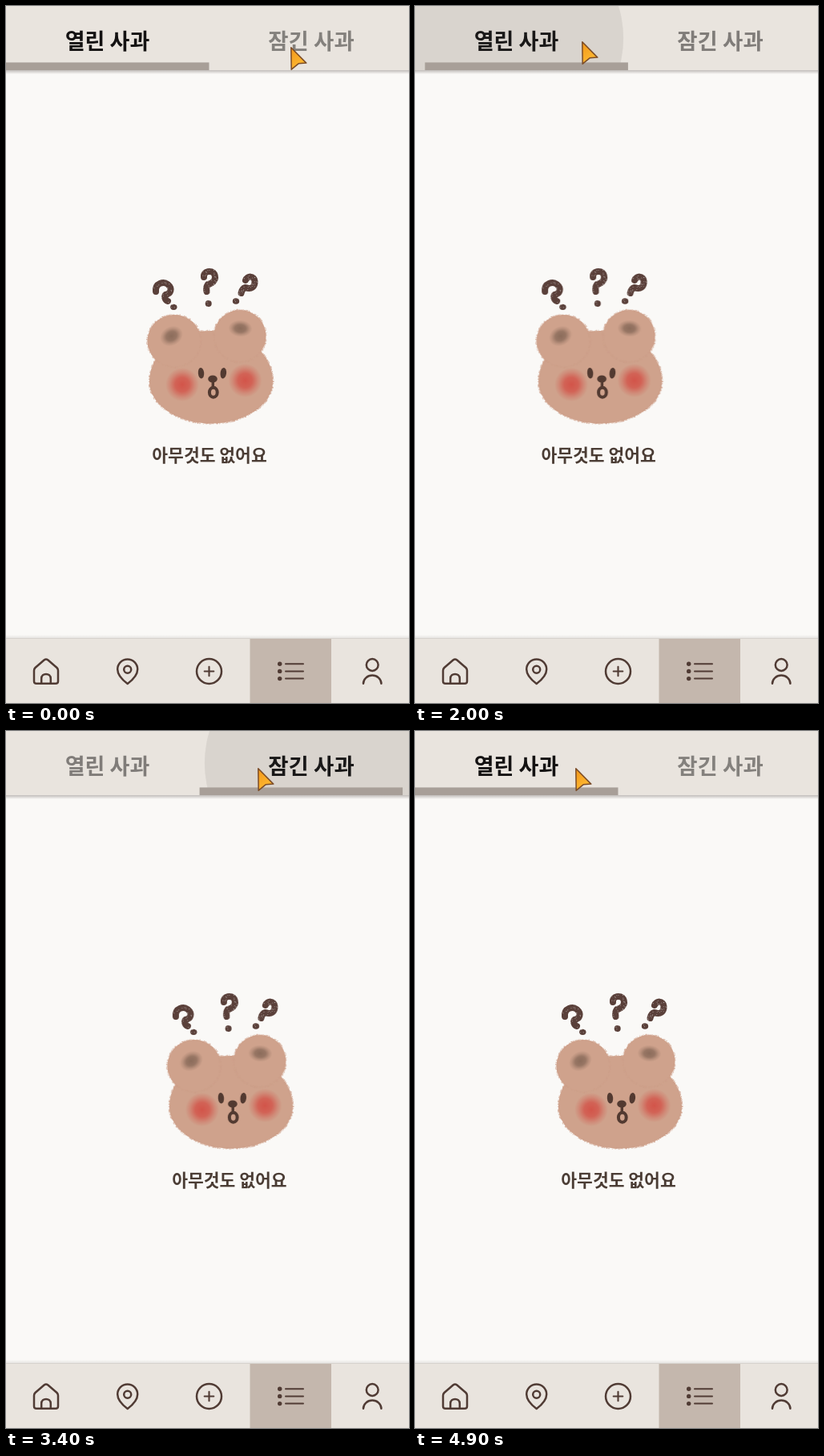
An HTML page with a canvas that plays this animation: 503 by 869 pixels, repeating every 5 s.

```html
<!DOCTYPE html>
<html lang="ko">
<head>
<meta charset="utf-8">
<title>사과 목록</title>
<style>
html, body { margin: 0; width: 100%; height: 100%; overflow: hidden; background: #faf9f7; }
canvas { display: block; width: 503px; height: 869px; }
</style>
</head>
<body>
<canvas id="stage"></canvas>
<script>
const W = 503, H = 869, LOOP = 5000, STEP = 100;
const PAGE = 508, TAB = PAGE / 2, BAR = 80, NAV = 788;
const FONT = '"Noto Sans CJK KR", "Noto Sans CJK", sans-serif';
const SLIDE = 338, FADE = 330;
const BROWN = '#503b34', FUR = '#cfa28c', INK = '#5a403a';

// Each tap: target tab, press, start of the page slide, release.
const taps = [
  { to: 1, press: 80, slide: 551, release: 700 },
  { to: 0, press: 1710, slide: 1755, release: 1835 },
  { to: 1, press: 3110, slide: 3155, release: 3235 },
  { to: 0, press: 4455, slide: 4505, release: 4540 }
];

// Pointer keys: time, x, y.
const pointer = [
  [0, 355, 51], [1000, 355, 51], [1100, 265, 46], [1200, 211, 44], [1300, 208, 44],
  [2500, 208, 44], [2600, 247, 44], [2700, 298, 45], [2800, 314, 46],
  [3700, 314, 46], [3800, 296, 46], [3900, 250, 46], [4000, 212, 46], [4100, 200, 46],
  [LOOP, 200, 46]
];

const clamp = v => Math.max(0, Math.min(1, v));
const mix = (a, b, k) => a + (b - a) * k;

// cubic-bezier(.25, .1, .25, 1)
function ease(x) {
  let lo = 0, hi = 1;
  for (let i = 0; i < 24; i++) {
    const s = (lo + hi) / 2;
    if (.75 * s * (1 - s) + s * s * s < x) lo = s; else hi = s;
  }
  const s = (lo + hi) / 2, r = 1 - s;
  return .3 * s * r * r + 3 * s * s * r + s * s * s;
}

function random(seed) {
  return () => (seed = (seed * 16807) % 2147483647) / 2147483647;
}

function makeCanvas(canvas) {
  const dpr = window.devicePixelRatio || 1;
  canvas.width = Math.round(W * dpr);
  canvas.height = Math.round(H * dpr);
  const c = canvas.getContext('2d');
  c.scale(dpr, dpr);
  c.lineCap = c.lineJoin = 'round';
  return c;
}

function oval(c, x, y, rx, ry, turn = 0) {
  c.beginPath();
  c.ellipse(x, y, rx, ry, turn, 0, Math.PI * 2);
}

function disc(c, color, ...shape) {
  c.fillStyle = color;
  oval(c, ...shape);
  c.fill();
}

function line(c, d, color, width) {
  c.strokeStyle = color;
  c.lineWidth = width;
  c.stroke(new Path2D(d));
}

function label(c, text, x, y, size, color) {
  c.font = `700 ${size}px ${FONT}`;
  c.textAlign = 'center';
  c.fillStyle = color;
  c.fillText(text, x, y);
}

// Soft spot, solid up to the given share of its radius.
function spot(c, x, y, rx, ry, turn, rgb, alpha, core) {
  c.save();
  c.translate(x, y);
  c.rotate(turn);
  c.scale(rx, ry);
  const g = c.createRadialGradient(0, 0, 0, 0, 0, 1);
  g.addColorStop(0, `rgba(${rgb},${alpha})`);
  g.addColorStop(core, `rgba(${rgb},${alpha * .82})`);
  g.addColorStop(.75, `rgba(${rgb},${alpha * .3})`);
  g.addColorStop(1, `rgba(${rgb},0)`);
  disc(c, g, 0, 0, 1, 1);
  c.restore();
}

function drawQuestions(c, rnd) {
  line(c, 'M187 356 C186 345 197 343 202 347 C208 352 206 359 199 360 C197 363 199 367 202 368', INK, 8);
  line(c, 'M247 338 C246 330 257 329 260 334 C263 340 259 346 252 347 C250 350 250 354 250.5 356', INK, 8);
  line(c, 'M299 342 C301 336 310 336 310.5 343 C311 350 306 354 299 351 C295 352 294 355 293.5 358', INK, 8);
  disc(c, INK, 209.3, 375.3, 4.2, 3.6);
  disc(c, INK, 252.7, 371, 4, 4);
  disc(c, INK, 287, 368, 4.2, 3.8);
  c.globalCompositeOperation = 'destination-out';
  for (let i = 0; i < 480; i++) {
    disc(c, 'rgba(0,0,0,.45)', 180 + rnd() * 138, 326 + rnd() * 53, .55, .55);
  }
  c.globalCompositeOperation = 'source-over';
}

function drawBear(c, rnd) {
  // Each part: centre, half width, height above and below the centre.
  const parts = [[256, 468, 77, 63, 52.5], [210, 417.5, 33.5, 32.5, 32.5], [292, 411.5, 32.5, 32.5, 32.5]];
  for (const [x, y, rx, up, down] of parts) {
    c.fillStyle = FUR;
    c.beginPath();
    c.ellipse(x, y, rx, up, 0, Math.PI, Math.PI * 2);
    c.ellipse(x, y, rx, down, 0, 0, Math.PI);
    c.fill();
    for (let i = 0; i < rx * 9; i++) {
      const a = rnd() * Math.PI * 2, out = rnd() * 2 - 1, s = Math.sin(a);
      disc(c, 'rgba(207,162,140,.5)', x + (rx + out) * Math.cos(a), y + ((s < 0 ? up : down) + out) * s, .75, .75);
    }
  }
  spot(c, 206.5, 411.5, 15, 12, -.5, '128,99,83', .85, .45);
  spot(c, 292.5, 402, 15, 10.5, .05, '128,99,83', .85, .45);
  spot(c, 220, 472, 21, 21, 0, '211,78,68', .92, .42);
  spot(c, 298.5, 467, 21, 21, 0, '211,78,68', .92, .42);
  const dark = '#523a31';
  disc(c, dark, 243.5, 457.7, 3.7, 6.8, -.08);
  disc(c, dark, 271.3, 457.7, 3.7, 6.8, .12);
  disc(c, dark, 258, 465, 5.8, 4.6);
  line(c, 'M258.3 466 V474', dark, 3.4);
  c.lineWidth = 4;
  oval(c, 258.8, 481.7, 4.9, 6);
  c.stroke();
}

const ctx = makeCanvas(document.getElementById('stage'));
const art = document.createElement('canvas');
const artCtx = makeCanvas(art);
drawQuestions(artCtx, random(71));
drawBear(artCtx, random(29));

function pagePosition(t) {
  let p = 0;
  for (const tap of taps) p = mix(p, tap.to, ease(clamp((t - tap.slide) / SLIDE)));
  return p;
}

function pointerAt(t) {
  const i = pointer.findIndex(key => key[0] > t);
  const [t0, x0, y0] = pointer[i - 1], [t1, x1, y1] = pointer[i];
  const k = (t - t0) / (t1 - t0);
  return [mix(x0, x1, k), mix(y0, y1, k)];
}

// A full circle fades in while a second one spreads from the pointer.
function drawRipple(tap, t) {
  const age = t - tap.press;
  const fade = 1 - clamp((t - tap.release) / FADE);
  if (age <= 0 || fade <= 0) return;
  const cx = TAB * (tap.to + .5), cy = BAR / 2;
  const radius = Math.hypot(TAB / 2, cy);
  const ripple = (alpha, x, y, r) => disc(ctx, `rgba(20,8,14,${alpha * fade})`, x, y, r, r);
  ripple(.074 * clamp(age / 120), cx, cy, radius);
  const spread = clamp((age - 50) / 225);
  if (spread > 0) {
    const k = 1 - (1 - spread) ** 2, [px, py] = pointerAt(tap.press);
    ripple(.074 * clamp((age - 50) / 75), mix(px, cx, k), mix(py, cy, k), radius * mix(.3, 1, k));
  }
}

function drawPage(x) {
  if (x <= -PAGE || x >= PAGE) return;
  ctx.drawImage(art, x, 0, W, H);
  label(ctx, '아무것도 없어요', x + 254, 568, 21.5, '#4a3c34');
}

function shade(y0, y1, alpha) {
  const g = ctx.createLinearGradient(0, y0, 0, y1);
  g.addColorStop(0, `rgba(60,50,45,${alpha})`);
  g.addColorStop(1, 'rgba(60,50,45,0)');
  ctx.fillStyle = g;
  ctx.fillRect(0, Math.min(y0, y1), W, Math.abs(y1 - y0));
}

function drawTabs(t, p) {
  shade(BAR, BAR + 5, .3);
  ctx.save();
  ctx.beginPath();
  ctx.rect(0, 0, W, BAR);
  ctx.clip();
  ctx.fillStyle = '#e9e4de';
  ctx.fillRect(0, 0, W, BAR);
  taps.forEach(tap => drawRipple(tap, t));
  const ink = k => `rgba(20,18,18,${mix(.47, 1, k)})`;
  label(ctx, '열린 사과', 126.5, 53.5, 27, ink(1 - p));
  label(ctx, '잠긴 사과', 381, 53.5, 27.5, ink(p));
  ctx.fillStyle = '#a89f98';
  ctx.fillRect(p * TAB, 70.4, TAB - .5, 9.6);
  ctx.restore();
}

function drawNav() {
  shade(NAV, NAV - 4, .1);
  ctx.fillStyle = '#e9e4de';
  ctx.fillRect(0, NAV, W, H - NAV);
  ctx.fillStyle = '#d6d2cd';
  ctx.fillRect(0, NAV, W, 1);
  ctx.fillStyle = '#c4b7ad';
  ctx.fillRect(304.5, NAV + 1, 101.5, H - NAV - 1);
  const icon = d => line(ctx, d, BROWN, 2.5);
  const ring = (x, y, r) => { oval(ctx, x, y, r, r); ctx.stroke(); };
  icon('M35 828.5 Q35 826.5 36.5 825 L47.5 815.5 Q50 813.5 52.5 815.5 L63.5 825 Q65 826.5 65 828.5 V842 Q65 844.8 62 844.8 H38 Q35 844.8 35 842 Z');
  icon('M44.2 844.5 V838.5 C44.2 831 55.8 831 55.8 838.5 V844.5');
  icon('M151.7 845 C147 841.5 139.2 834.5 139.2 827 A12.5 12.5 0 0 1 164.2 827 C164.2 834.5 156.4 841.5 151.7 845 Z');
  ring(151.7, 827.2, 4.5);
  ring(253.5, 829.5, 15.5);
  line(ctx, 'M247.7 829.5 H259.3 M253.5 823.7 V835.3', BROWN, 2.1);
  for (const y of [820.2, 829.4, 838.6]) {
    disc(ctx, BROWN, 341.7, y, 2.7, 2.7);
    line(ctx, `M349 ${y} H371`, BROWN, 2);
  }
  ctx.lineWidth = 2.5;
  ring(457.2, 821.5, 7.4);
  icon('M446 844.8 A11.2 10.2 0 0 1 468.4 844.8');
}

function drawPointer(x, y) {
  ctx.save();
  ctx.translate(x + .8, y + .8);
  const g = ctx.createLinearGradient(0, 4, 16, 24);
  g.addColorStop(0, '#f39a1c');
  g.addColorStop(1, '#ffbd35');
  const arrow = new Path2D('M0 0 L19 19.3 L9.3 20 L.4 27.4 Z');
  ctx.fillStyle = g;
  ctx.fill(arrow);
  ctx.strokeStyle = '#7b4c28';
  ctx.lineWidth = 1.5;
  ctx.stroke(arrow);
  ctx.restore();
}

function draw(t) {
  const p = pagePosition(t);
  ctx.fillStyle = '#faf9f7';
  ctx.fillRect(0, 0, W, H);
  drawPage(-p * PAGE);
  drawPage((1 - p) * PAGE);
  drawTabs(t, p);
  drawNav();
  drawPointer(...pointerAt(t));
}

const start = performance.now();
function tick() {
  const t = (performance.now() - start) % LOOP;
  draw(Math.floor(t / STEP) * STEP);
  requestAnimationFrame(tick);
}
tick();
</script>
</body>
</html>
```
